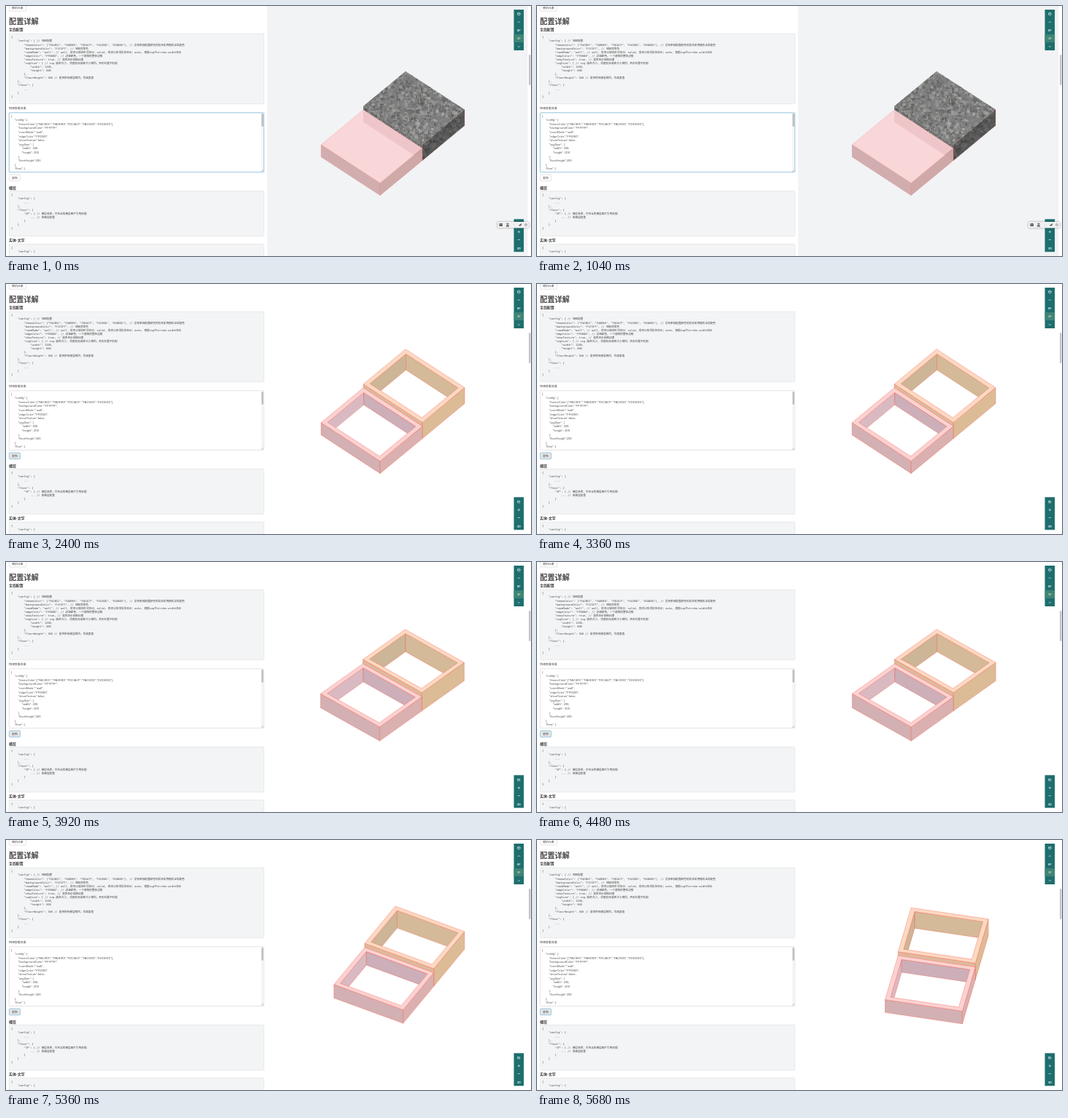
These frames come from a looping animation (720x344 px, 5.76 s). An HTML page with a canvas:

```html
<!DOCTYPE html>
<html lang="zh">
<head>
<meta charset="utf-8">
<title>配置详解</title>
<style>
html, body { margin: 0; width: 100%; height: 100%; overflow: hidden; background: #fff; }
canvas, svg { position: absolute; left: 0; top: 0; width: 720px; height: 344px; }
text { white-space: pre; fill: #444; font-family: "Noto Sans CJK SC", "Noto Sans CJK", sans-serif; }
.head { font-size: 4.95px; font-weight: 700; fill: #333; }
.code { font: 3.65px "DejaVu Sans Mono", "Noto Sans CJK SC", monospace; }
.edit { font: 4.12px "Liberation Sans", sans-serif; fill: #555; }
.box { fill: #f3f4f5; stroke: #dcdddf; stroke-width: .6; }
.field { fill: #fff; stroke: #d0d0d0; stroke-width: .6; }
.glow { fill: none; stroke: #8cc6e4; stroke-width: .8; }
.bar { fill: #1e6e6e; }
.icon { fill: none; stroke: #d5e6e4; stroke-width: .7; }
.label { font: bold 4px "Liberation Sans", sans-serif; fill: #e2efed; text-anchor: middle; }
.ime { filter: drop-shadow(0 .6px 1px #0006); }
</style>
</head>
<body>
<canvas id="view"></canvas>
<svg id="page" viewBox="0 0 720 344"></svg>
<script>
const LOOP = 5760, STEP = 80, PRESS = 1520, RENDER = 1680;
const page = document.getElementById('page');
const view = document.getElementById('view');
const ctx = view.getContext('2d');
const dpr = window.devicePixelRatio || 1;
view.width = 720 * dpr;
view.height = 344 * dpr;

// ---- page ----
function add(tag, attrs, parent = page) {
  const el = document.createElementNS('http://www.w3.org/2000/svg', tag);
  for (const k in attrs) el.setAttribute(k, attrs[k]);
  parent.append(el);
  return el;
}
const rect = (x, y, width, height, cls, rx = 0, parent) =>
  add('rect', { x, y, width, height, rx, class: cls }, parent);
const path = (d, cls, parent) => add('path', { d, class: cls }, parent);
function text(str, x, y, attrs = {}, parent) {
  const el = add('text', { x, y, ...attrs }, parent);
  el.textContent = str;
  return el;
}
const lines = (src, x, y, pitch, cls) =>
  src.split('\n').forEach((s, i) => text(s, x, y + i * pitch, { class: cls }));

rect(4.3, -4, 23, 11, 'field', 1);
text('随机元素', 8, 4.3, { 'font-size': 3.9 });
text('配置详解', 4, 25.3, { 'font-size': 10.2, 'font-weight': 700 });
text('全局配置', 4, 34.3, { class: 'head' });

rect(4.3, 38, 349.4, 96.6, 'box', 1);
lines(`{
    "config": { // 地图配置
        "themeColor": ["FAC8D2", "FADEB9", "FDCACF", "FACEDD", "EDDEED"], // 没有单独配置颜色的实体采用随机全局配色
        "backgroundColor": "F1F2F7", // 地图背景色
        "roomMode": "wall", // wall, 房间以墙体形式显示；solid, 房间以有顶实体显示；auto, 根据svg中stroke-width显示
        "edgeColor": "FF0000", // 边缘颜色，一个建筑的整体边框
        "showTexture": true, // 是否显示贴图纹理
        "svgSize": { // svg 画布大小, 须跟实际画布大小相同，否则位置不匹配
            "width": 1200,
            "height": 800
        },
        "floorHeight": 300 // 是否所有楼层相同，均高度值
    },
    "floor": {
        ...
    }
}`, 7, 44.4, 5.08, 'code');

text('快速查看效果', 4, 141.6, { 'font-size': 3.95 });
rect(4.3, 146.8, 349.4, 81.8, 'field', 1);
const EDIT = `{
 "config": {
  "themeColor":["FAC8DC","FADEB9","FDCACF","FACEDD","EDDEED"],
  "backgroundColor":"FFFFFF",
  "roomMode":"wall",
  "edgeColor":"FF0000",
  "showTexture":false,
  "svgSize": {
   "width": 200,
   "height": 200
  },
  "floorHeight":200
 },
 "floor": {`;
EDIT.split('\n').forEach((s, i) => {
  const body = s.trimStart();
  text(body, 7 + (s.length - body.length) * 4.9, 152.5 + i * 5.61, { class: 'edit' });
});
add('line', { x1: 18, x2: 32, y1: 192.9, y2: 192.9, stroke: '#e88', 'stroke-width': .4, 'stroke-dasharray': '.8 .5' });
rect(350, 147.3, 3.4, 80.8).setAttribute('fill', '#f5f5f5');
rect(350.5, 148, 2.4, 18, '', 1.2).setAttribute('fill', '#bdbdbd');
add('path', { d: 'M350 228l3-3M351.6 228l1.4-1.4', stroke: '#888', 'stroke-width': .4 });
const fieldGlow = rect(4.3, 146.8, 349.4, 81.8, 'glow', 1);

const button = rect(4.4, 232.2, 15, 8.6, 'field', 1);
const buttonGlow = rect(4.4, 232.2, 15, 8.6, 'glow', 1);
text('更新', 8, 237.9, { 'font-size': 3.9 });

text('楼层', 4, 251.7, { class: 'head' });
rect(4.3, 254.6, 349.4, 62, 'box', 1);
lines(`{
    "config": {
        ...
    },
    "floor": {
        "3F": { // 楼层名称，可包含的楼层图片引用依据
            ... // 各楼层配置
        }
    }
}`, 7, 261.3, 5.1, 'code');

text('实体-文字', 4, 324, { class: 'head' });
rect(4.3, 327.6, 349.4, 30, 'box', 1);
lines('{\n    "config": {', 7, 334.2, 5.1, 'code');

// ---- toolbars ----
rect(696.5, 5, 13.6, 56, 'bar');
rect(696.5, 39, 13.6, 11, '').setAttribute('fill', '#3d8578');
path('M703.3 9l1.8 1v2l-1.8 1-1.8-1v-2zM701.5 10l1.8 1 1.8-1', 'icon');
path('M701.6 23l1.7-1.7 1.7 1.7M701.6 55l1.7 1.7 1.7-1.7', 'icon');
text('8F', 703.3, 34.8, { class: 'label' });
text('1F', 703.3, 45.9, { class: 'label' }).style.fill = '#e9d9a0';
rect(696.5, 293.3, 13.6, 45, 'bar');
path('M701.7 298v3h3v-2.2h-2.4m.9-1l-1 1 1 1M701.6 310.8h3.4m-1.7-1.7v3.4M701.6 321.6h3.4', 'icon');
text('3D', 703.3, 334.5, { class: 'label' });
rect(717, 67, 2.4, 42, '', 1.2).setAttribute('fill', '#c4c4c4');

const ime = add('g', {});
rect(673.8, 297, 43.6, 8.4, 'ime', 1.5, ime).setAttribute('fill', '#f0f0f0');
rect(676.5, 299.2, 4.4, 3.8, '', .3, ime).setAttribute('fill', '#444');
add('path', { d: 'M677 300.4h3.4M677 301.6h3.4', stroke: '#ddd', 'stroke-width': .4 }, ime);
text('英', 685.7, 302.8, { 'font-size': 4.4, 'font-weight': 700 }, ime);
text(':', 696, 302.4, { 'font-size': 4 }, ime);
add('path', { d: 'M706.4 298.9a2.2 2.2 0 1 1-3.6 2.6q2.6.3 3.6-2.6', fill: '#333' }, ime);
add('circle', { cx: 713, cy: 301.1, r: 1.4, fill: 'none', stroke: '#777', 'stroke-width': .7 }, ime);

// ---- model ----
const U0 = -39.2, U1 = 69.1, V0 = -60.7, V1 = 26.6, V2 = 113.9, WALL = 6.4;
const EDGE = 'rgba(255,65,45,.48)', SOFT_EDGE = 'rgba(240,90,80,.25)';
const rooms = [
  { v0: V0, v1: V1, h: 32.5, rim: '#fbd9c3', inU: '#cdb597', inV: '#d4ba98', outU: '#dcbc97', outV: '#dfb99d' },
  { v0: V1, v1: V2, h: 25, rim: '#fad2d2', inU: '#d9bac2', inV: '#ccafb8', outU: '#dab1b0', outV: '#d3b0b3' }
];
// time, pan, pitch, yaw
const poses = [
  [0, 0, 47.4, 41.6], [3520, 0, 47.4, 41.6], [3920, -.6, 39.4, 41.6], [4240, -.6, 39.4, 41.6],
  [5040, 2, 39.4, 41.6], [5120, 2, 39.4, 41.6], [5680, 2, 45.2, 11.8], [LOOP, 2, 45.2, 11.8]
];
let project;

function setPose(t) {
  const i = poses.findIndex(p => p[0] > t);
  const a = poses[i - 1], b = poses[i], k = (t - a[0]) / (b[0] - a[0]);
  const [, pan, pitch, yaw] = a.map((n, j) => n + (b[j] - n) * k);
  const rad = Math.PI / 180;
  const s = Math.sin(pitch * rad), c = Math.cos(pitch * rad);
  const sa = Math.sin(yaw * rad), ca = Math.cos(yaw * rad);
  project = (u, v, h) => [537 + pan + u * ca - v * sa, 172 + s * (u * sa + v * ca) - (h + 11.5) * c];
}

function trace(pts) {
  pts.forEach((p, i) => ctx[i ? 'lineTo' : 'moveTo'](...project(...p)));
  ctx.closePath();
}
function face(fill, edge, ...loops) {
  ctx.beginPath();
  loops.forEach(trace);
  ctx.fillStyle = fill;
  ctx.fill('evenodd');
  if (!edge) return;
  ctx.strokeStyle = edge;
  ctx.stroke();
}
const flat = (u0, u1, v0, v1, h) => [[u0, v0, h], [u1, v0, h], [u1, v1, h], [u0, v1, h]];
const alongU = (u0, u1, v, h) => [[u0, v, 0], [u1, v, 0], [u1, v, h], [u0, v, h]];
const alongV = (u, v0, v1, h) => [[u, v0, 0], [u, v1, 0], [u, v1, h], [u, v0, h]];

function hollow({ v0, v1, h, rim, inU, inV, outU, outV }) {
  const a = U0 + WALL, b = U1 - WALL, c = v0 + WALL, d = v1 - WALL;
  face(inU, EDGE, alongV(a, c, d, h));
  face(inV, EDGE, alongU(a, b, c, h));
  face(outV, EDGE, alongU(U0, U1, v1, h));
  face(outU, EDGE, alongV(U1, v0, v1, h));
  face(rim, EDGE, flat(U0, U1, v0, v1, h), flat(a, b, c, d, h));
}

// Speckled stone, laid square to the screen.
function makeStone() {
  const tile = document.createElement('canvas');
  const size = 160, zoom = 4;
  tile.width = tile.height = size * zoom;
  const g = tile.getContext('2d');
  g.scale(zoom, zoom);
  let seed = 7;
  const rnd = () => (seed = seed * 16807 % 2147483647) / 2147483647;
  g.fillStyle = '#7d7e7d';
  g.fillRect(0, 0, size, size);
  for (let i = 0; i < 4200; i++) {
    const l = 75 + 115 * rnd();
    g.fillStyle = `rgba(${l},${l},${l - 1},.5)`;
    g.fillRect(rnd() * size - 2, rnd() * size - 2, 1 + rnd() * 4, 1 + rnd() * 4);
  }
  const pattern = ctx.createPattern(tile, 'repeat');
  pattern.setTransform(new DOMMatrix().scale(1 / zoom));
  return pattern;
}
const stone = makeStone();

function stoneFace(shade, loop) {
  face(stone, null, loop);
  face(`rgba(20,20,20,${shade})`, null, loop);
}

function solid() {
  const [back, front] = rooms;
  stoneFace(.12, alongU(U0, U1, V1, back.h));
  stoneFace(0, flat(U0, U1, V0, V1, back.h));
  stoneFace(.38, alongV(U1, V0, V1, back.h));
  face('transparent', SOFT_EDGE, alongV(U1, V0, V1, back.h));
  face('#f9d6d8', SOFT_EDGE, flat(U0, U1, V1, V2, front.h));
  face('#d2adb0', SOFT_EDGE, alongU(U0, U1, V2, front.h));
  face('#cfa9a8', SOFT_EDGE, alongV(U1, V1, V2, front.h));
  face('rgba(205,155,158,.27)', null, alongU(U0, U1, V1, front.h));
}

function frame() {
  const t = Math.floor(performance.now() % LOOP / STEP) * STEP;
  const pressed = t >= PRESS, done = t >= RENDER;
  fieldGlow.style.display = pressed ? 'none' : '';
  buttonGlow.style.display = pressed ? '' : 'none';
  button.style.fill = !pressed ? '#fff' : done ? '#e6e6e6' : '#d0cfce';
  ime.style.display = done ? 'none' : '';

  ctx.setTransform(dpr, 0, 0, dpr, 0, 0);
  ctx.fillStyle = '#fff';
  ctx.fillRect(0, 0, 720, 344);
  ctx.lineWidth = .65;
  ctx.lineJoin = 'round';
  setPose(t);
  if (done) {
    rooms.forEach(hollow);
  } else {
    ctx.fillStyle = '#f2f3f5';
    ctx.fillRect(358, 0, 357.5, 344);
    solid();
  }
  requestAnimationFrame(frame);
}
frame();
</script>
</body>
</html>
```
